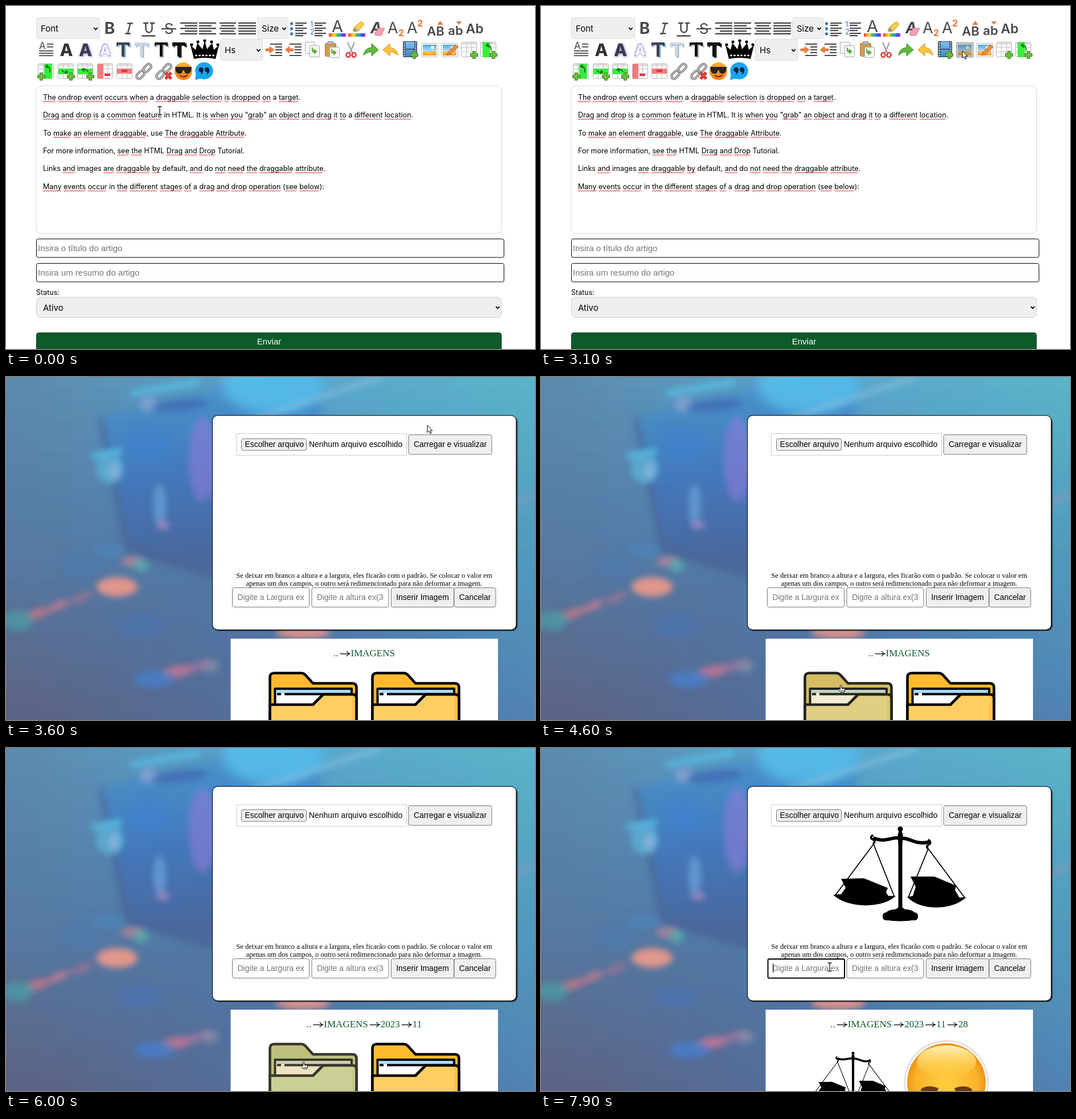
An HTML page with a canvas that plays this animation: 929x603 px, repeating every 8000 ms.

```html
<!DOCTYPE html>
<html lang="pt">
<head>
<meta charset="utf-8">
<style>
html, body { margin: 0; width: 100%; height: 100%; overflow: hidden; background: #fff; }
canvas { display: block; }
</style>
</head>
<body>
<canvas id="stage" width="929" height="603"></canvas>
<script>
const W = 929, H = 603, LOOP = 8000;
const stage = document.getElementById('stage').getContext('2d');
let c = stage;

const INTER = 'Inter, sans-serif', SANS = '"Liberation Sans", Arial, sans-serif', SERIF = '"Liberation Serif", "Times New Roman", serif';
const INK = '#484848', GREEN = '#0d5a2b';

// Drawing helpers
function text(s, x, y, font, color = '#000', align = 'left') {
  c.font = font;
  c.fillStyle = color;
  c.textAlign = align;
  c.fillText(s, x, y);
}
function shape(d, fill, stroke, width = 1, x = 0, y = 0, scale = 1) {
  const p = new Path2D(d);
  c.save();
  c.translate(x, y);
  c.scale(scale, scale);
  c.lineWidth = width;
  if (fill) { c.fillStyle = fill; c.fill(p); }
  if (stroke) { c.strokeStyle = stroke; c.stroke(p); }
  c.restore();
}
function box(x, y, w, h, r, fill, stroke, width = 1) {
  c.beginPath();
  c.roundRect(x, y, w, h, r);
  c.lineWidth = width;
  if (fill) { c.fillStyle = fill; c.fill(); }
  if (stroke) { c.strokeStyle = stroke; c.stroke(); }
}
function oval(x, y, rx, ry, fill, angle = 0) {
  c.beginPath();
  c.ellipse(x, y, rx, ry, angle, 0, Math.PI * 2);
  c.fillStyle = fill;
  c.fill();
}
function ramp(x0, y0, x1, y1, colors) {
  const g = c.createLinearGradient(x0, y0, x1, y1);
  colors.forEach((v, i) => g.addColorStop(i / (colors.length - 1), v));
  return g;
}
function layer(draw) {
  const cv = document.createElement('canvas');
  cv.width = W;
  cv.height = H;
  c = cv.getContext('2d');
  draw();
  c = stage;
  return cv;
}
const chevron = (x, y) => shape('M-3.2 -1.6L0 1.7L3.2 -1.6', null, '#000', 1.8, x, y);

// Toolbar icons
function select(x, y, w, h, label, r = 3) {
  box(x + .5, y + .5, w - 1, h - 1, r, '#efefef', '#dcdcdc');
  text(label, x + 8, y + h / 2 + 5.8, '15px ' + INTER);
  chevron(x + w - 7.5, y + h / 2 + .8);
}
function rows(x0, x1, cut, side, y0 = 30) {
  for (let i = 0; i < 5; i++) {
    const d = i % 2 ? cut : 0;
    c.fillStyle = INK;
    c.fillRect(x0 + (side === 'l' ? 0 : side === 'r' ? d : d / 2), y0 - 1.2 + i * 4.7, x1 - x0 - d, 2.4);
  }
}
function plus(x, y) {
  shape('M-2.5 -6.5h5v4h4v5h-4v4h-5v-4h-4v-5h4z', '#6dbb3c', '#3c8520', 1, x, y);
}
function table(x, y, mark, plusX) {
  box(x + .5, y + .5, 27, 26, 2, '#fafafa', '#b8b8b8');
  c.fillStyle = '#e2e2e2';
  c.fillRect(x + 1, y + 1, 26, 4);
  shape('M9.5 1v25M18.5 1v25M1 9.5h26M1 17.5h26', null, '#c4c4c4', 1, x, y);
  if (mark) {
    c.fillStyle = mark[4];
    c.fillRect(x + mark[0], y + mark[1], mark[2], mark[3]);
  }
  if (plusX) plus(x + plusX, y + 23);
}
function rainbow(x, y, w) {
  c.fillStyle = ramp(x, 0, x + w, 0, ['#e33', '#f93', '#fd3', '#4b4', '#39e', '#44d', '#c3c']);
  c.fillRect(x, y, w, 6);
}
function picture(x, y) {
  box(x + .5, y + .5, 29, 24, 1, '#fff', '#b5b5b5');
  c.fillStyle = ramp(0, y + 3, 0, y + 15, ['#4fa5e6', '#bfe2f8']);
  c.fillRect(x + 3, y + 3, 24, 13);
  c.fillStyle = '#f2992e';
  c.fillRect(x + 3, y + 15, 24, 7);
  shape('M3 17q5 -5 10 -2t14 0v4q-12 2 -24 -1z', '#f8c24c', null, 1, x, y);
  oval(x + 20, y + 8, 3, 3, '#fff4b0');
}
function link(x, y) {
  for (const [dx, dy] of [[7, 20], [19, 8]]) {
    c.save();
    c.translate(x + dx, y + dy);
    c.rotate(-.8);
    box(-8, -4.5, 16, 9, 4.5, null, '#666', 4);
    box(-8, -4.5, 16, 9, 4.5, null, '#c8c8c8', 2);
    c.restore();
  }
}
function bigT(x, face, shade) {
  const d = 'M0 0h23v7h-2q-.5 -3 -4 -3h-3v21h-5v-21h-4q-3 0 -3.5 3h-1.5z';
  shape(d, shade, null, 1, x + 2.5, 66);
  shape(d, face, null, 1, x, 64);
}
function indent(x, arrow) {
  shape(arrow, '#f07b3c', '#d35f22', .6, x, 71);
  for (let i = 0; i < 5; i++) {
    const wide = i === 0 || i === 4;
    c.fillStyle = INK;
    c.fillRect(x + (wide ? 8 : 17), 66 + i * 5, wide ? 21 : 12, 2);
  }
}
function sheet(x, y, w, h) {
  box(x + .5, y + .5, w, h, 1, '#f8f8f8', '#a9a9a9');
}

function firstRow() {
  select(53, 20, 112, 38, 'Font');
  text('B', 182, 49, 'bold 28px ' + INTER, INK, 'center');
  shape('M213 30.5h10M209 48.5h10M218.5 30L213.5 49', null, INK, 2.4);
  shape('M245.5 29.5v11a5.5 6 0 0 0 11 0v-11M241 30h9M253 30h8.5M238.5 52.5h24', null, INK, 2.4);
  text('S', 286, 49, '26px ' + INTER, INK, 'center');
  c.fillRect(273, 39, 26, 2.2);
  rows(306, 336, 8, 'r');
  rows(339, 369, 8, 'l');
  rows(375, 404, 6, 'c');
  rows(408, 439, 0, 'l');
  select(441, 20, 55, 38, 'Size');
  for (let i = 0; i < 3; i++) {
    const y = 30 + i * 9;
    oval(501.5, y + 1, 2.7, 2.7, '#3f78bd');
    for (const x of [508, 542]) {
      c.fillStyle = INK;
      c.fillRect(x, y - 1, 20, 2.2);
      c.fillRect(x, y + 3, 14, 2.2);
    }
  }
  text('1', 534, 37, '13px ' + INTER, '#3f78bd');
  text('2', 534, 50, '13px ' + INTER, '#3f78bd');
  text('A', 582, 46, '29px ' + INTER, INK, 'center');
  rainbow(567, 48, 30);
  shape('M609 44l3 -7l12 -10l5 5l-10 12z', '#f6cd4b', '#c99a25');
  shape('M609 44l3 -7l6 6l-5 3z', '#9a9a9a');
  rainbow(601, 48, 30);
  text('A', 650, 48, 'italic bold 27px ' + INTER, INK, 'center');
  shape('M647 48l7 -9h11l-6 13h-10z', '#f3a1b4', '#d87b93');
  text('A', 670, 48, '27px ' + INTER, INK);
  text('2', 689, 53, 'bold 16px ' + INTER, '#e8733a');
  text('A', 704, 48, '27px ' + INTER, INK);
  text('2', 722, 36, 'bold 16px ' + INTER, '#e8733a');
  text('AB', 754.5, 52, '600 22px ' + INTER, INK, 'center');
  shape('M757 33l5.5 -7l5.5 7z', '#ee7b4a');
  text('ab', 789.5, 51, '600 22px ' + INTER, INK, 'center');
  shape('M790.5 27h10l-5 6z', '#ee7b4a');
  text('Ab', 823, 48, '600 23px ' + INTER, INK, 'center');
}

function secondRow() {
  text('A', 58, 76, '17px ' + INTER, INK);
  c.fillRect(72, 66, 11, 1.8);
  c.fillRect(72, 71, 11, 1.8);
  for (let i = 0; i < 3; i++) c.fillRect(58, 78 + i * 4.2, 25, 1.8);
  text('A', 106, 88, '800 30px ' + INTER, '#333', 'center');
  c.save();
  c.shadowColor = '#7d7dd8';
  c.shadowBlur = 4;
  c.shadowOffsetX = c.shadowOffsetY = 1;
  text('A', 139.5, 88, '800 30px ' + INTER, '#3a3a4a', 'center');
  c.shadowOffsetX = c.shadowOffsetY = 0;
  text('A', 174, 88, 'bold 28px ' + INTER, '#8c8ce8', 'center');
  c.restore();
  text('A', 174, 87, 'bold 25px ' + INTER, '#fff', 'center');
  bigT(194, '#3c4450', '#8fb9de');
  bigT(226, '#cfd8e0', '#9fc0dc');
  bigT(261, '#111', '#bbb');
  bigT(292, '#111', '#222');
  shape('M0 9l9 8l3 -12l9 11l4 -15l4 15l9 -11l3 12l9 -8l-6 24q-19 -4 -38 0z', '#000', null, 1, 324, 60);
  for (const [x, y] of [[326, 68], [337, 63], [349, 61], [361, 63], [372, 68]]) oval(x, y, 2.6, 2.6, '#000');
  shape('M330 85q19 -5 38 0v7q-19 -4 -38 0z', '#000');
  for (let i = 0; i < 6; i++) oval(334 + i * 6, 87, 2, 1.4, '#fff');
  select(376, 58, 75, 38, 'Hs');
  indent(456, 'M0 4h7v-4l8 6l-8 6v-4h-7z');
  indent(490, 'M15 4h-7v-4l-8 6l8 6v-4h7z');
  const paste = 'M0 0v5q0 4 4 4v3l6 -5l-6 -5v3q-2 0 -2 -5z';
  sheet(525, 63, 17, 20);
  sheet(533, 69, 17, 20);
  shape(paste, '#5dae3a', null, 1, 537, 73);
  box(560.5, 65.5, 19, 23, 2, '#d39a4e', '#a87431');
  box(565, 62.5, 10, 5, 1, '#bbb', '#888');
  sheet(568, 72, 17, 18);
  shape(paste, '#5dae3a', null, 1, 571, 75);
  shape('M600 64l8 18M612 64l-8 18', null, '#a8a8a8', 2.6);
  shape('M601 82a3.5 4 0 1 0 .1 0zM611 82a3.5 4 0 1 0 .1 0z', null, '#d23a3a', 2.6);
  const turn = 'M0 23q1 -13 14 -14v-7l12 11l-12 11v-7q-8 -1 -14 6z';
  shape(turn, '#62b83e', '#3d8c22', 1, 628, 64);
  c.save();
  c.translate(688, 64);
  c.scale(-1, 1);
  shape(turn, '#f7c33f', '#cf9420');
  c.restore();
  box(697.5, 62.5, 24, 27, 1, '#3b5a78', '#2b435a');
  c.fillStyle = ramp(0, 64, 0, 89, ['#7cc0f0', '#3b86cc']);
  c.fillRect(702, 63, 15, 12);
  c.fillRect(702, 77, 15, 12);
  c.fillStyle = '#e8eef4';
  for (let i = 0; i < 6; i++) {
    c.fillRect(698.5, 64 + i * 4.4, 2, 2.4);
    c.fillRect(718.5, 64 + i * 4.4, 2, 2.4);
  }
  plus(717, 86);
  picture(729, 65);
  picture(764, 65);
  shape('M774 87l2 -6l14 -13l4 4l-14 13z', '#ef8a3a', '#b8601c');
  table(799, 63, null, 23);
  table(833, 63, [4, 1, 13, 26, '#37ee3c'], 23);
  shape('M852 78q0 -10 -8 -9l3 -3M844 69l4 4', null, '#1a6a1a', 1.8);
}

function thirdRow() {
  table(56, 101, [11, 1, 14, 26, '#37ee3c'], 6);
  shape('M77 117q1 -12 -7 -11l3 -3M70 106l4 3', null, '#1a6a1a', 1.8);
  table(91, 101, [1, 9, 26, 10, '#37ee3c'], 23);
  shape('M98 112q2 6 10 4l-3 -3M108 116l-4 3', null, '#1a6a1a', 1.8);
  table(125, 101, [1, 9, 26, 10, '#37ee3c'], 23);
  shape('M144 116q-2 -6 -10 -4l3 -3M134 112l4 3', null, '#1a6a1a', 1.8);
  table(160, 101, [1, 1, 10, 26, '#f27b7b']);
  c.fillStyle = '#d33';
  c.fillRect(173, 119, 10, 4);
  table(194, 101, [1, 9, 26, 9, '#f27b7b']);
  c.fillStyle = '#d33';
  c.fillRect(203, 112, 10, 4);
  link(229, 101);
  link(264, 101);
  shape('M280 117l10 11M290 117l-10 11', null, '#b31d1d', 5);
  shape('M280 117l10 11M290 117l-10 11', null, '#e04a3f', 3);
  oval(311.5, 114.5, 15.5, 15.5, ramp(0, 99, 0, 130, ['#ffb52b', '#f5761c']));
  shape('M297 107h29l-1 7q-2 5 -7 5q-4 0 -5.5 -6h-2q-1 6 -5.5 6q-5 0 -7 -5z', '#2b2220');
  shape('M305 122q8 5 14 -1', null, '#6b2a10', 1.8);
  oval(348, 114, 15.8, 15, '#1aa3f2');
  shape('M334 118l-2 12l12 -3z', '#1aa3f2');
  for (const x of [342.5, 353]) {
    oval(x, 112, 4.2, 4.2, '#0b2238');
    shape('M4 0q1 6 -5 9q2 -4 1 -6z', '#0b2238', null, 1, x, 112);
  }
}

const LINES = [
  'The ondrop event occurs when a draggable selection is dropped on a target.',
  'Drag and drop is a common feature in HTML. It is when you "grab" an object and drag it to a different location.',
  'To make an element draggable, use The draggable Attribute.',
  'For more information, see the HTML Drag and Drop Tutorial.',
  'Links and images are draggable by default, and do not need the draggable attribute.',
  'Many events occur in the different stages of a drag and drop operation (see below):'
];
const KNOWN = new Set('a To use HTML For more information Tutorial Links images do It in default'.split(' '));

function squiggle(x, y, w) {
  c.beginPath();
  for (let i = 0; i <= w; i += 2) c.lineTo(x + i, y + (i % 4 ? 1.1 : -1.1));
  c.strokeStyle = '#e8252a';
  c.lineWidth = 1;
  c.stroke();
}

const editorPage = layer(() => {
  c.fillStyle = '#fff';
  c.fillRect(0, 0, W, H);
  firstRow();
  secondRow();
  thirdRow();
  LINES.forEach((line, i) => {
    const y = Math.round(165 + i * 31.35), font = '12.5px ' + INTER;
    text(line, 65, y, font);
    for (const m of line.matchAll(/[A-Za-z]+/g)) {
      if (KNOWN.has(m[0])) continue;
      squiggle(65 + c.measureText(line.slice(0, m.index)).width, y + 3, c.measureText(m[0]).width);
    }
  });
  [['Insira o título do artigo', 410], ['Insira um resumo do artigo', 453]].forEach(([s, y]) => {
    box(53.5, y - .5, 821, 32.5, 3, '#fff', '#000');
    text(s, 56, y + 21, '15px ' + SANS, '#757575');
  });
  text('Status:', 53, 508, '12.5px ' + INTER);
  box(53.5, 512, 816.5, 35.5, 7, '#efefef', '#cfcfcf');
  text('Ativo', 65, 535.5, '15px ' + INTER);
  chevron(863.5, 530);
  box(53.5, 574.5, 816.5, 40, 4, GREEN, '#083a1b');
  text('Enviar', 462, 594.5, '15px ' + SANS, '#fff', 'center');
});

const backdrop = layer(() => {
  const tiny = document.createElement('canvas');
  tiny.width = tiny.height = 3;
  const k = tiny.getContext('2d');
  ['#5c8aad', '#5aa5cd', '#5bb4c8', '#567aa3', '#4f7bab', '#529cbe', '#5e6282', '#526f9d', '#5083b4']
    .forEach((v, i) => { k.fillStyle = v; k.fillRect(i % 3, i / 3 | 0, 1, 1); });
  c.drawImage(tiny, .5, .5, 2, 2, 0, 0, W, H);
  c.filter = 'blur(10px)';
  shape('M166 70L330 30L548 -20L560 260L365 345L215 305z', ramp(280, 40, 330, 320, ['rgba(64,140,205,.7)', 'rgba(60,112,190,.7)', 'rgba(72,96,150,.7)']));
  oval(470, 15, 90, 50, 'rgba(88,196,240,.75)');
  c.filter = 'blur(6px)';
  shape('M166 72L215 300L365 348', null, 'rgba(72,88,138,.5)', 9);
  shape('M220 30L340 8M150 140L205 130', null, 'rgba(88,191,232,.8)', 12);
  shape('M430 75L660 0', null, 'rgba(140,195,225,.7)', 8);
  shape('M890 225L929 205', null, 'rgba(160,150,190,.6)', 8);
  const spots = [
    [250, 48, 16, 14, 'rgba(140,165,215,.7)'], [305, 50, 50, 10, 'rgba(65,85,165,.5)', -.1],
    [345, 145, 24, 75, 'rgba(150,125,220,.55)'], [250, 120, 40, 32, 'rgba(60,130,215,.4)'],
    [182, 160, 24, 28, 'rgba(92,190,226,.65)'], [190, 165, 10, 16, 'rgba(160,185,225,.6)'],
    [270, 225, 11, 36, 'rgba(115,175,226,.6)'], [276, 260, 12, 8, 'rgba(180,140,195,.7)'],
    [180, 305, 28, 13, 'rgba(75,140,195,.5)'], [130, 335, 32, 17, 'rgba(75,125,180,.5)'],
    [222, 324, 20, 9, 'rgba(205,135,150,.7)'], [238, 332, 14, 11, 'rgba(85,180,175,.7)'],
    [195, 369, 36, 17, 'rgba(232,152,140,.95)'], [55, 416, 24, 8, 'rgba(215,120,135,.75)', -.3],
    [92, 402, 20, 7, 'rgba(212,125,145,.75)', -.4], [132, 388, 22, 7, 'rgba(180,115,145,.6)', -.4],
    [20, 428, 28, 17, 'rgba(75,160,168,.7)'], [235, 437, 42, 20, 'rgba(75,118,185,.55)'],
    [300, 518, 28, 10, 'rgba(215,120,150,.75)', -.2], [340, 508, 22, 9, 'rgba(175,120,165,.6)', -.3],
    [260, 531, 36, 15, 'rgba(70,130,215,.65)'], [360, 508, 14, 12, 'rgba(140,150,172,.6)'],
    [522, 448, 48, 12, 'rgba(232,148,138,.9)']
  ];
  for (const [x, y, rx, ry, color, angle] of spots) oval(x, y, rx, ry, color, angle);
});

// Dialog
const UI = '13.88px ' + SANS;
function button(x, y, w, h, label) {
  box(x + .5, y + .5, w - 1, h - 1, 3, '#efefef', '#767676');
  text(label, x + w / 2, Math.floor(y + h / 2 + 5), UI, '#000', 'center');
}
function field(x, label, focus) {
  if (focus) box(x + 1.5, 371, 134.5, 33.5, 2, '#fff', '#000', 2);
  else box(x + .5, 370.5, 135, 34, 3, '#fff', '#767676');
  c.save();
  c.beginPath();
  c.rect(x + 9, 372, 118, 31);
  c.clip();
  text(label, x + 9.5, 392, UI, '#757575');
  c.restore();
  if (focus) {
    c.fillStyle = '#000';
    c.fillRect(x + 10, 379, 1, 16);
  }
}
function scales(x, y, size, color) {
  c.save();
  c.translate(x, y);
  c.scale(size, size);
  oval(0, 4.5, 4.5, 4.5, color);
  shape('M-2.5 8h5l2 6l-1 20v108l7 6h-21l7 -6v-108l-1 -20z', color);
  shape('M0 21C-14 16 -24 30 -48 20M0 21C16 18 26 34 51 27', null, color, 6);
  shape('M-48 15q-7 5 0 8q6 3 0 8M49 23q7 5 1 9q-6 3 -1 7', null, color, 3.6);
  shape('M-47 31L-115 122M-47 31L-11 122M49 39L14 125M49 39L113 125', null, color, 1.8);
  shape('M-118 120L-104 119L-96 108L-104 92L-64 91L-22 108L-25 116L-21 122L-8 122C-30 144 -92 145 -118 120z', color);
  shape('M12 124L22 122L27 106L18 88L60 88L98 104L96 112L104 125L116 124C92 148 35 149 12 124z', color);
  oval(0, 151, 24, 6, color);
  box(-31, 151, 62, 14, 6, color);
  oval(0, 161, 28, 5.5, color);
  c.restore();
}
const COOL = ['#ffb92e', '#ffce62', '#ffffff', '#a9dcf9', '#000000'];
const WARM = ['#bcc07f', '#cbd096', '#ece2bd', '#d0d0a8', '#3a382f'];
function mix(a, b, p) {
  const at = (s, i) => parseInt(s.slice(i, i + 2), 16);
  return `rgb(${[1, 3, 5].map(i => Math.round(at(a, i) + (at(b, i) - at(a, i)) * p))})`;
}
function folder(x, p) {
  const [back, front, paper, blue, line] = COOL.map((v, i) => mix(v, WARM[i], p));
  c.save();
  c.translate(x, 518);
  c.lineJoin = 'round';
  shape('M2.5 100V10q0 -7.500 7.500 -7.500H57q5 0 8 3.500L78 20.500H147q7.500 0 7.500 7.500V100z', back, line, 4.6);
  shape('M11.500 60V30H146V60z', paper, line, 4);
  c.fillStyle = blue;
  c.fillRect(13.5, 32, 130.5, 6);
  shape('M15 39.500H22M28 39.500H146', null, line, 3.8);
  shape('M2.500 100V58H78L96 40H147q7.500 0 7.500 7V100z', front, line, 4.6);
  c.fillStyle = back;
  c.globalAlpha = .45;
  c.fillRect(146, 43, 6, 60);
  c.restore();
}
function sadFace(x, y) {
  c.save();
  c.shadowColor = 'rgba(0,0,0,.4)';
  c.shadowBlur = 4;
  oval(x, y, 72, 72, '#fff');
  c.restore();
  const g = c.createRadialGradient(x, y + 10, 15, x, y, 69);
  g.addColorStop(0, '#ffc93c');
  g.addColorStop(.75, '#fbb02a');
  g.addColorStop(1, '#ec9516');
  oval(x, y, 69, 69, g);
  oval(x, y - 36, 52, 29, ramp(0, y - 65, 0, y - 8, ['rgba(255,246,200,.95)', 'rgba(255,226,120,.6)', 'rgba(255,215,90,.05)']));
  shape('M-46 13Q-35 2 -14 10Q-15 18 -28 18Q-38 18 -46 13zM46 13Q35 2 14 10Q15 18 28 18Q38 18 46 13z', '#6a3b12', null, 1, x, y);
}
function breadcrumb(parts) {
  const font = '17px ' + SERIF, gap = 22;
  c.font = font;
  const all = ['..', ...parts], widths = all.map(s => c.measureText(s).width);
  let x = 629 - (widths.reduce((a, b) => a + b) + gap * parts.length) / 2;
  all.forEach((s, i) => {
    text(s, x, 491, font, GREEN);
    x += widths[i];
    if (i < parts.length) {
      shape('M3 0H19.500M14.500 -4.500Q16.500 -1 20 0Q16.500 1 14.500 4.500', null, '#000', 1.25, x, 486.5);
      x += gap;
    }
  });
}
function dialog(t) {
  c.save();
  c.shadowColor = 'rgba(0,0,0,.85)';
  c.shadowBlur = 2;
  c.shadowOffsetX = c.shadowOffsetY = 2;
  box(363, 68, 533, 376, 9, '#fff');
  c.restore();
  box(362.5, 67.5, 533.5, 377, 9, null, '#000');
  box(404.5, 99.5, 299, 38, 0, null, '#ccc');
  box(413.5, 108.5, 114, 20.5, 3, '#efefef', '#767676');
  text('Escolher arquivo', 419.5, 123, UI);
  text('Nenhum arquivo escolhido', 532, 123, UI);
  button(706.5, 101, 147, 35.5, 'Carregar e visualizar');
  text('Se deixar em branco a altura e a largura, eles ficarão com o padrão. Se colocar o valor em', 629, 353, '12.54px ' + SERIF, '#000', 'center');
  text('apenas um dos campos, o outro será redimencionado para não deformar a imagem.', 629, 367, '12.54px ' + SERIF, '#000', 'center');
  field(397, 'Digite a Largura ex(300)', t >= 7200);
  field(536.5, 'Digite a altura ex(300)', false);
  button(676, 370, 111, 35, 'Inserir Imagem');
  button(786.5, 370, 74, 35, 'Cancelar');
  if (t >= 6800) scales(631, 138, 1, '#000');
}

// Timeline
const OPENED = [5200, 5700, 6200];
function hoverAmount(t) {
  if (t < 4500) return 0;
  const start = OPENED.filter(v => v <= t).pop() || 4500;
  const u = Math.min(1, (t - start + 100) / 500);
  const shown = 1 - (1 - u) ** 2;
  return t < 7000 ? shown : Math.max(0, 1 - (t - 6900) / 500);
}
const PATH = [
  [0, 270, 184], [300, 265, 178], [1000, 265, 178], [1200, 430, 196], [1500, 727, 169], [1650, 838, 152],
  [1800, 822, 150], [2000, 790, 105], [2200, 752, 66], [2300, 742, 79], [2700, 740, 79], [3400, 740, 79],
  [3600, 740, 85], [3900, 700, 230], [4400, 530, 535], [4900, 523, 552], [7000, 523, 552], [7200, 507, 386], [7800, 507, 386], [7900, 507, 385]
];
function pointer(t) {
  const i = PATH.findIndex(p => p[0] > t);
  if (i < 0) return PATH[PATH.length - 1].slice(1);
  const [t0, x0, y0] = PATH[i - 1], [t1, x1, y1] = PATH[i], u = (t - t0) / (t1 - t0);
  return [x0 + (x1 - x0) * u, y0 + (y1 - y0) * u];
}
function cursor(t) {
  const [x, y] = pointer(t).map(Math.round);
  if (t < 3200 ? y > 140 : t >= 7200) {
    const d = 'M-3.5 -7.5Q-.5 -7.5 0 -6Q.5 -7.5 3.5 -7.5M0 -6V6M-3.5 7.5Q-.5 7.5 0 6Q.5 7.5 3.5 7.5';
    shape(d, null, '#fff', 3, x, y);
    shape(d, null, '#111', 1.3, x, y);
  } else if (t > 3600 && y > 518) {
    shape('M-1.5 .5Q0 -1.5 1 .5V5H5.5Q7 5.5 6.5 8L5.5 12H-1L-4.5 7.5Q-4.5 5.5 -1.5 7z', '#fff', '#000', 1, x, y);
    shape('M-1 9.5H5.5M2.5 5v2M4.5 5v2', null, '#000', .7, x, y);
  } else {
    shape('M0 0V12.5L2.8 9.9L4.9 14.6L7 13.7L5 9.2H8.8z', '#fff', '#000', 1, x, y);
  }
}
function drawEditor(t) {
  c.drawImage(editorPage, 0, 0);
  const focus = t >= 500 && t < 3000;
  if (focus) box(53.5, 141, 816.5, 258, 8, null, '#111', 2);
  else box(53, 140.5, 817.5, 259, 8, null, '#d9d9d9');
  if (focus && t < 2100 && (t - 500) % 1060 < 530) {
    c.fillStyle = '#000';
    c.fillRect(65, 153, 1, 16);
  }
  if (t >= 2300) {
    c.fillStyle = 'rgba(90,90,90,.28)';
    c.fillRect(729, 63, 31, 28);
  }
}
function drawPicker(t) {
  const p = hoverAmount(t), depth = OPENED.filter(v => v <= t).length;
  c.drawImage(backdrop, 0, 0);
  dialog(t);
  c.fillStyle = '#fff';
  c.fillRect(394.5, 460, 469.5, 150);
  breadcrumb(['IMAGENS', '2023', '11', '28'].slice(0, depth + 1));
  if (depth < 3) {
    folder(461, p);
    folder(641, 0);
  } else {
    scales(548, 534, .58, mix(COOL[4], WARM[4], p));
    sadFace(712, 588);
  }
}
function draw(now) {
  const t = Math.floor((now % LOOP) / 100) * 100;
  c.fillStyle = '#fff';
  c.fillRect(0, 0, W, H);
  if (t < 3200) drawEditor(t);
  else if (t >= 3600) drawPicker(t);
  else if (t >= 3400) {
    c.save();
    c.translate(6, 0);
    dialog(t);
    c.restore();
  }
  cursor(t);
}
const begin = performance.now();
function tick() {
  draw(performance.now() - begin);
  requestAnimationFrame(tick);
}
tick();
</script>
</body>
</html>
```
